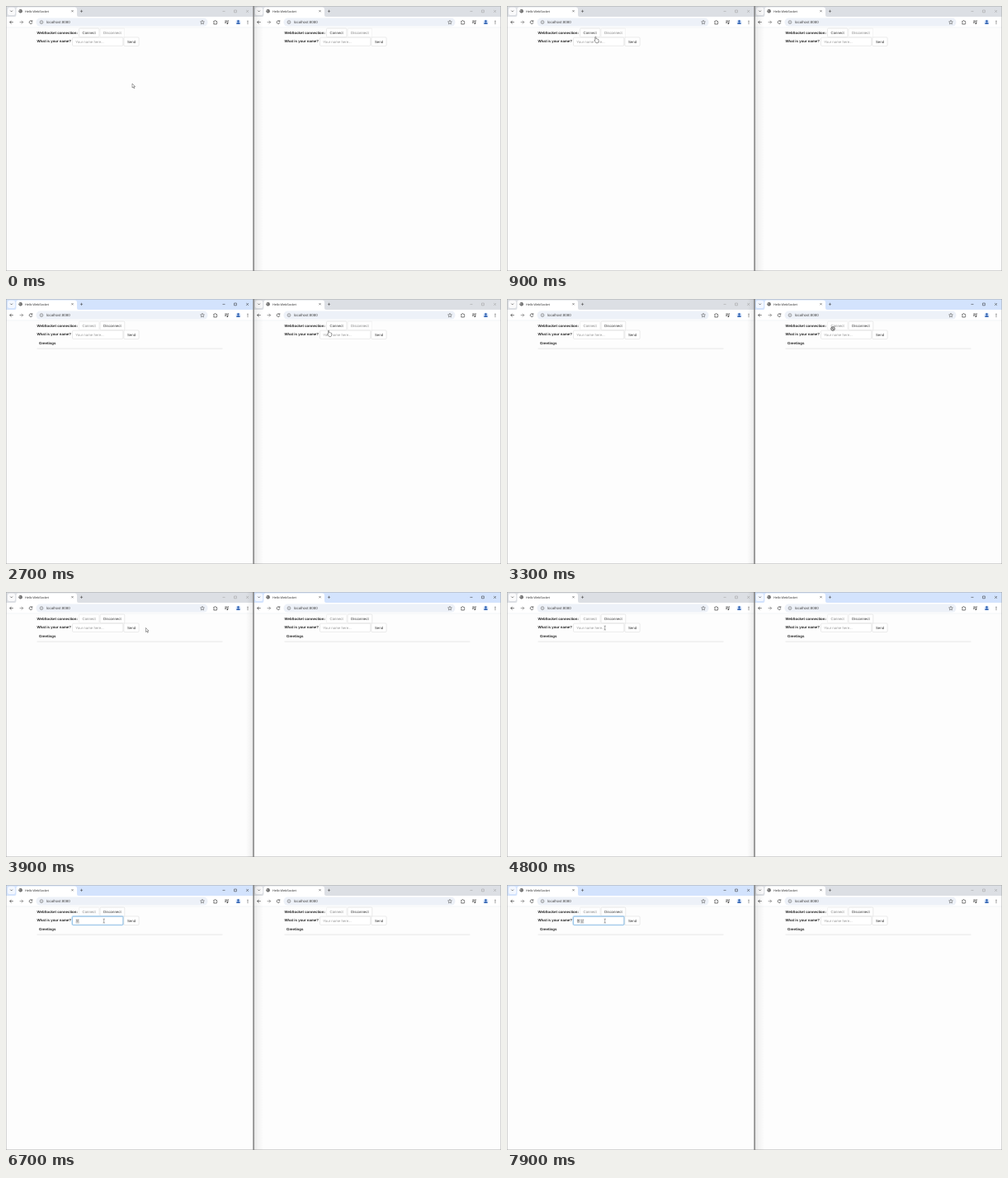
An HTML page that plays this animation: 600x321 px, repeating every 8000 ms.

```html
<!DOCTYPE html>
<html lang="en">
<head>
<meta charset="utf-8">
<title>Two browser windows</title>
<style>
  html, body { margin: 0; width: 100%; height: 100%; overflow: hidden; background: #fff; }
  svg { display: block; width: 100vw; height: 100vh; }
  text { font: 4.375px "Liberation Sans", Arial, sans-serif; text-rendering: geometricPrecision; white-space: pre; }
  .bold { font-weight: 700; }
  .hangul { font-family: "Noto Sans CJK KR", "Noto Sans CJK", sans-serif; }
</style>
</head>
<body>
<svg id="stage" viewBox="0 0 600 321" preserveAspectRatio="none"></svg>
<script>
const LOOP = 8000;
const CONNECT_LEFT = 1600, CONNECT_RIGHT = 3300, FOCUS_INPUT = 5000;
const stage = document.getElementById('stage');

// Cursor path: time, x, y
const path = [
  [0, 153, 94], [250, 153, 94], [1000, 105, 34.5], [1600, 105, 34.5],
  [2400, 381, 43], [2700, 391, 38.2], [3100, 395, 36], [3350, 395, 36],
  [4100, 122, 45], [4350, 122, 45], [4700, 118.7, 43.5], [LOOP, 118.7, 43.5]
];

// Typing steps: time, finished text, syllable being composed
const typing = [
  [6400, '', 'ㅂ'], [6550, '', '보'], [6750, '', '봄'],
  [6950, '봄', 'ㄴ'], [7200, '봄', '나'], [7500, '봄', '날']
];

const ease = u => u * u * (3 - 2 * u);
const rect = (x, y, w, h, fill, extra = '') =>
  `<rect x="${x}" y="${y}" width="${w}" height="${h}" fill="${fill}" ${extra}/>`;
const line = (d, color, width = 0.5, fill = 'none') =>
  `<path d="${d}" fill="${fill}" stroke="${color}" stroke-width="${width}"/>`;
const disc = (x, y, r, fill, extra = '') =>
  `<circle cx="${x}" cy="${y}" r="${r}" fill="${fill}" ${extra}/>`;
const label = (x, y, s, color = '#333', cls = '', size = 4.375) =>
  `<text x="${x}" y="${y}" fill="${color}" class="${cls}" style="font-size:${size}px">${s}</text>`;

function cursorAt(t) {
  const i = Math.max(1, path.findIndex(p => p[0] > t));
  const [t0, x0, y0] = path[i - 1], [t1, x1, y1] = path[i];
  const u = ease((t - t0) / (t1 - t0));
  return { x: x0 + (x1 - x0) * u, y: y0 + (y1 - y0) * u };
}

const overConnect = (p, dx) => p.x > dx + 88.4 && p.x < dx + 112.9 && p.y > 27 && p.y < 38.4;
const overInput = (p, dx) => p.x > dx + 80.3 && p.x < dx + 142 && p.y > 38.4 && p.y < 48.3;

function button(x, y, w, s, enabled) {
  return `<g opacity="${enabled ? 1 : 0.6}">` +
    rect(x, y, w, 10.6, '#fff', 'rx="1.2" stroke="#ccc" stroke-width=".4"') +
    label(x + 4, y + 6.6, s) + '</g>';
}

function tabStrip(active) {
  const ink = active ? '#222' : '#999';
  return rect(0, 0, 300, 13, active ? '#d3e3fd' : '#dcdfe4') +
    rect(2, 1.8, 9.2, 9.2, active ? '#f3f7ff' : '#fafafb', 'rx="2.6"') +
    line('M5.3 5.6l1.3 1.3 1.3-1.3', '#222', 0.6) +
    `<path d="M10.4 13q2 0 2-2V4q0-2.6 2.6-2.6H83.4q2.6 0 2.6 2.6v7q0 2 2 2z" fill="#fff"/>` +
    disc(17.6, 6.3, 2.2, '#555') + line('M16 5.6l1.6-.5.6 1-1.2 1.4zM18.4 7.2l.9-.4', '#eee', 0.45) +
    label(23, 7.6, 'Hello WebSocket', '#333', '', 3.75) +
    line('M79.4 5.1l2.2 2.2m0-2.2l-2.2 2.2', '#333') +
    line('M91.5 4.7v3.2m-1.6-1.6h3.2', '#333') +
    line('M262.5 6.4h3', ink) + line('M276.6 5h2.8v2.8h-2.8z', ink) +
    line('M291.2 5l2.8 2.8m0-2.8l-2.8 2.8', ink);
}

const toolbar = rect(0, 13, 300, 13, '#fff') +
  line('M8.7 19.6H4.6m1.9-1.9l-1.9 1.9 1.9 1.9', '#333', 0.65) +
  line('M16.6 19.6h4.1m-1.9-1.9l1.9 1.9-1.9 1.9', '#666', 0.6) +
  line('M31.5 18.4a1.9 1.9 0 1 0 .4 1.8M31.8 17.3v1.6h-1.6', '#333', 0.65) +
  rect(36.5, 14.6, 208, 10, '#edf1f8', 'rx="5"') +
  disc(43, 19.6, 1.9, 'none', 'stroke="#555" stroke-width=".5"') + line('M43 19.3v1.4m0-2.3v.5', '#555', 0.45) +
  label(49, 21.2, 'localhost:8080', '#444', '', 4.45) +
  line('M238 17.2l.7 1.6 1.7.2-1.3 1.2.4 1.7-1.5-.9-1.5.9.4-1.7-1.3-1.2 1.7-.2z', '#444', 0.5) +
  line('M251.8 18.3h1.1q.7-1.8 1.4 0h1.1v1.2q1.6.6 0 1.3v1.2h-3.6v-1.2q1.2-.6 0-1.3z', '#333', 0.65) +
  line('M265.3 18h2.8m-2.8 1.3h2.3m-2.3 1.3h1.3m2.3.6v-3.4h1', '#222', 0.65) +
  disc(268.3, 21.2, 0.8, '#222') +
  disc(281.5, 19.6, 3, '#d8e6fb') + disc(281.5, 18.4, 1.2, '#174ea6') +
  `<path d="M279.1 21.8q0-1.8 2.4-1.8t2.4 1.8z" fill="#174ea6"/>` +
  [17.9, 19.6, 21.3].map(y => disc(293, y, 0.5, '#222')).join('') +
  line('M0 26H300', '#e1e4e9', 0.4);

function inputBox(focused, t) {
  const glow = focused ? ease(Math.min(1, (t - FOCUS_INPUT) / 150)) : 0;
  let out = rect(80, 37.8, 62.2, 10.8, 'none', `rx="1.5" stroke="#66afe9" stroke-width="1.4" opacity="${glow * 0.4}"`) +
    rect(80.5, 38.2, 61.3, 10.1, '#fff', 'rx="1.2" stroke="#ccc" stroke-width=".4"') +
    rect(80.5, 38.2, 61.3, 10.1, 'none', `rx="1.2" stroke="#66afe9" stroke-width=".55" opacity="${glow}"`);
  const step = focused && typing.filter(s => s[0] <= t).pop();
  if (!step) {
    out += label(84.3, 44.5, 'Your name here...', '#999');
    if (focused && (t - FOCUS_INPUT) % 1060 < 530) out += line('M84.3 41v4.8', '#333', 0.35);
    return out;
  }
  const [, done, composing] = step;
  const x = 84.5 + done.length * 4.375;
  return out + label(84.5, 44.9, done, '#333', 'hangul') +
    rect(x, 41, 4.4, 4.9, '#e2e2e2') + label(x, 44.9, composing, '#777', 'hangul') +
    line(`M${x} 46h4.4`, '#777', 0.35);
}

function browser(dx, active, connected, focused, t) {
  const greetings = label(40, 55.3, 'Greetings', '#222', 'bold') + line('M37.5 60.1H262.5', '#ddd', 0.7);
  return `<g transform="translate(${dx})">` +
    rect(0, 0, 300, 321, '#fdfdfd') + tabStrip(active) + toolbar +
    label(37.5, 33.5, 'WebSocket connection:', '#222', 'bold') +
    button(88.5, 27.1, 24.4, 'Connect', !connected) +
    button(114.1, 27.1, 29.7, 'Disconnect', connected) +
    label(37.5, 44.2, 'What is your name?', '#222', 'bold') +
    inputBox(focused, t) +
    button(142.9, 37.9, 18.2, 'Send', true) +
    (connected ? greetings : '') +
    rect(0, 0, 300, 321, 'none', 'stroke="#999" stroke-width=".8"') + '</g>';
}

function cursor(p, connectedLeft, connectedRight) {
  const dx = p.x < 300 ? 0 : 300;
  let shape;
  if (overInput(p, dx)) {
    shape = line('M-1.2-2.4h.9q.3 0 .3.4q0-.4.3-.4h.9M0-2V2M-1.2 2.4h.9q.3 0 .3-.4q0 .4.3.4h.9', '#333', 0.4);
  } else if (overConnect(p, dx)) {
    shape = (dx ? connectedRight : connectedLeft)
      ? disc(0, 0, 2.3, '#ccc', 'stroke="#666" stroke-width="1"') + line('M-1.7-1.7L1.7 1.7', '#666', 0.9)
      : line('M-.5 3V.2q.6-.9 1.1 0V2.5q.9-.5 1.1.2q.9-.3 1.1.3q.9-.2.9.7v1.5q0 1.4-1 2.2H.8L-1.4 4.6q-.2-1 .9-.5z', '#222', 0.45, '#fff');
  } else {
    shape = line('M0 0V5l1.2-1.1.9 2 .8-.4-.9-1.9h1.6z', '#222', 0.4, '#fff');
  }
  return `<g transform="translate(${p.x.toFixed(2)} ${p.y.toFixed(2)})">${shape}</g>`;
}

function shadow(rightOnTop) {
  const x = rightOnTop ? 291 : 300;
  return `<defs><linearGradient id="shade" x1="${+rightOnTop}" x2="${+!rightOnTop}">` +
    '<stop offset="0" stop-opacity=".1"/><stop offset=".4" stop-opacity=".04"/><stop offset="1" stop-opacity="0"/>' +
    '</linearGradient></defs>' + rect(x, 0, rightOnTop ? 9 : 12, 321, 'url(#shade)') +
    line('M300.2 0V321', '#777', 0.9);
}

let shown = '';
function draw(now) {
  const t = now % LOOP;
  const pointer = cursorAt(t);
  const leftOn = t >= CONNECT_LEFT, rightOn = t >= CONNECT_RIGHT, typingOn = t >= FOCUS_INPUT;
  const rightActive = rightOn && !typingOn;
  const scene = browser(0, leftOn && !rightActive, leftOn, typingOn, t) +
    browser(300, rightActive, rightOn, false, t) +
    shadow(rightActive) + cursor(pointer, leftOn, rightOn);
  if (scene !== shown) stage.innerHTML = shown = scene;
  requestAnimationFrame(draw);
}
draw(0);
</script>
</body>
</html>
```
